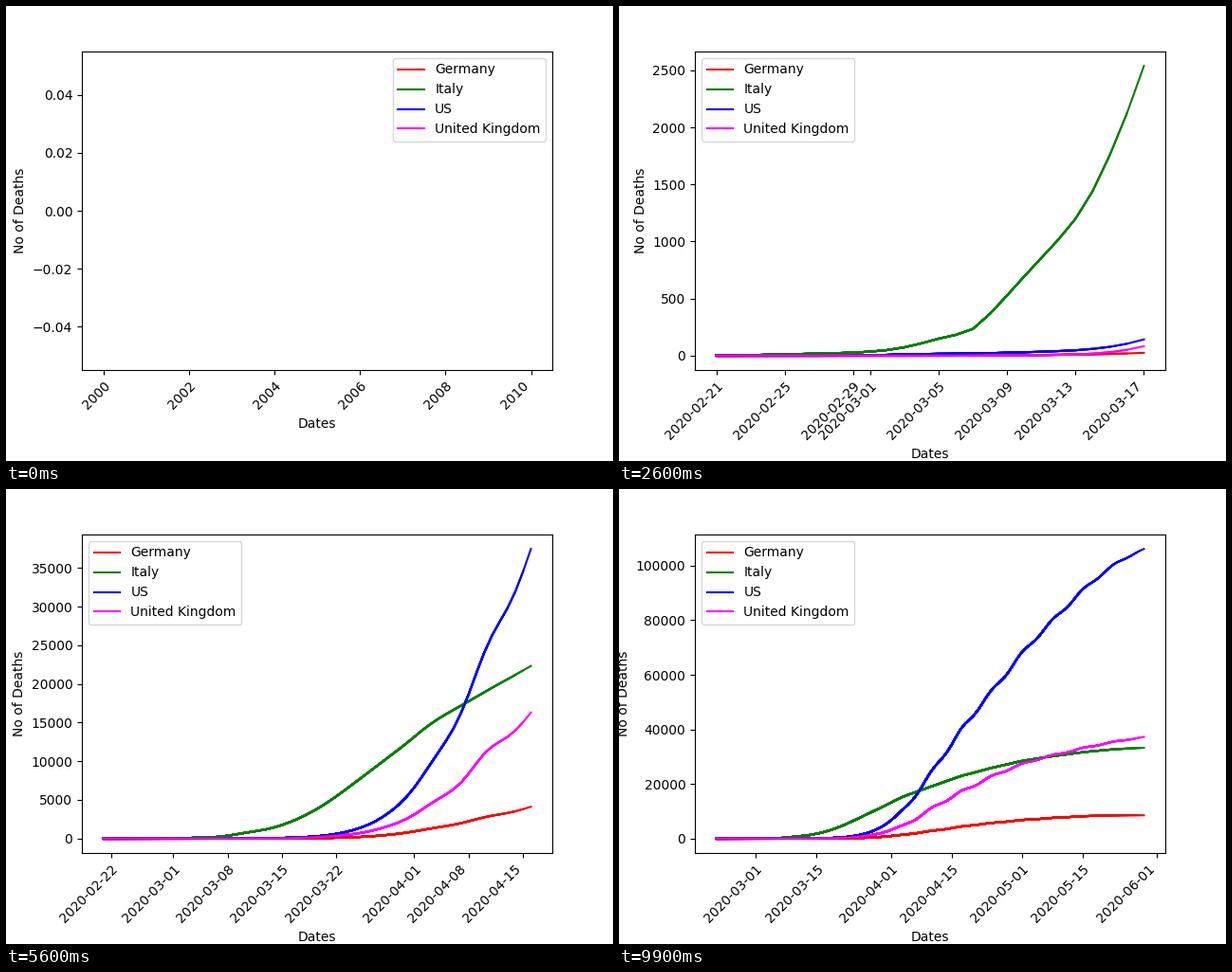
These frames come from a looping animation (640 px wide and 480 px high, 10 s). A matplotlib script:

```python
import matplotlib.pyplot as plt
import numpy as np
from matplotlib.animation import FuncAnimation

DATES = np.arange("2020-02-21", "2020-05-30", dtype="datetime64[D]")
DAY = np.arange(len(DATES))


def growth(keys, dip):
    """Cumulative totals: a smooth log curve through a few {day: total} keys,
    with new cases dipping every weekend once reporting is under way."""
    x = np.array(list(keys), float)
    y = np.log1p(list(keys.values()))
    slope = np.gradient(y, x, edge_order=2)

    # Cubic Hermite segments
    k = np.clip(np.searchsorted(x, DAY, side="right") - 1, 0, len(x) - 2)
    h = x[k + 1] - x[k]
    s = (DAY - x[k]) / h
    r = 1 - s
    curve = (y[k] * (1 + 2 * s) * r**2 + y[k + 1] * (1 + 2 * r) * s**2
             + h * s * r * (slope[k] * r - slope[k + 1] * s))
    total = np.maximum(np.expm1(curve), 0)

    ramp = np.clip((DAY - 35) / 20, 0, 1)
    week = 1 - dip * ramp * np.cos(2 * np.pi * (DAY - 2.3) / 7)
    return np.round(np.cumsum(np.diff(total, prepend=0) * week))


SERIES = [
    ("Germany", "red", growth(
        {0: 0, 16: 0, 18: 2, 25: 24, 33: 206, 40: 920, 46: 2016, 55: 4052,
         66: 6126, 77: 7510, 98: 8504}, 0.3)),
    ("Italy", "green", growth(
        {0: 1, 4: 10, 9: 34, 13: 148, 15: 233, 16: 366, 22: 1441, 30: 5476,
         40: 13155, 50: 19468, 66: 26977, 80: 30800, 98: 33229}, 0.1)),
    ("US", "blue", growth(
        {0: 0, 7: 0, 10: 6, 16: 21, 22: 58, 26: 191, 33: 1365, 40: 6600,
         45: 14500, 50: 25850, 55: 36950, 66: 59600, 80: 84600,
         98: 105900}, 0.3)),
    ("United Kingdom", "magenta", growth(
        {0: 0, 13: 0, 16: 2, 21: 10, 25: 82, 33: 703, 40: 3100, 45: 6550,
         50: 11600, 55: 16000, 64: 23300, 72: 28280, 80: 31600,
         98: 37150}, 0.45)),
]

fig = plt.figure(figsize=(6.4, 4.8), dpi=100)


def plot_days(n):
    for name, color, totals in SERIES:
        ax.plot(DATES[:n], totals[:n], color=color, label=name)


def init():
    global ax, legend
    fig.clear()
    ax = fig.add_subplot()
    fig.subplots_adjust(bottom=0.2, top=0.9)
    plt.setp(ax.get_xticklabels(), rotation=45, ha="right",
             rotation_mode="anchor")
    ax.set_xlabel("Dates")
    ax.set_ylabel("No of Deaths")
    plot_days(0)
    # Placeholder decade until there is data
    ax.set_xlim(np.datetime64("1999-07-02"), np.datetime64("2010-07-02"),
                auto=True)
    legend = ax.legend(loc="upper right")


def draw(n):
    # Lines pile up, so older stretches look heavier than the newest one
    if n:
        plot_days(n)
    legend.set_loc("upper right" if n < 2 else "upper left")


anim = FuncAnimation(fig, draw, frames=100, init_func=init, interval=100,
                     repeat=True, repeat_delay=0)
plt.show()
```
